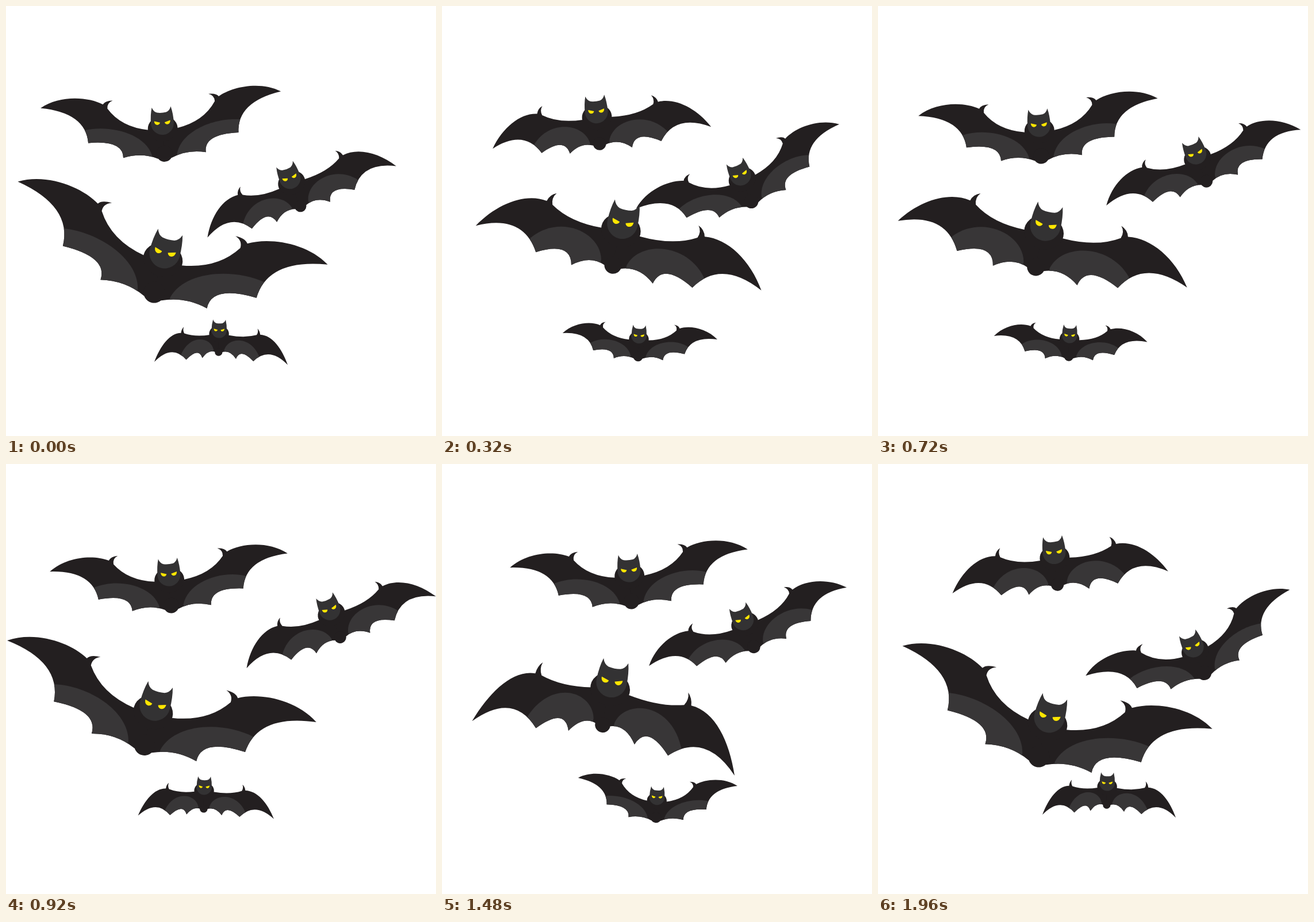
Write an HTML page with a canvas that moves like this. It is 748 by 748 pixels and loops after 2000 ms.

```html
<!DOCTYPE html>
<html lang="en">
<head>
<meta charset="utf-8">
<title>Flying bats</title>
<style>
html, body { margin: 0; height: 100%; overflow: hidden; background: #fff; }
canvas { display: block; }
</style>
</head>
<body>
<canvas id="stage" width="748" height="748"></canvas>
<script>
const ctx = document.getElementById('stage').getContext('2d');
const LOOP = 2000, STEP = 40, BOB = 48;
const DARK = '#231f20', GREY = '#383637', HEAD = '#333233', EYE = '#ffe600';

// Wing points, relative to the head: raised x, y, lowered x, y
const WING = [
  [25, 10, 25, 12],                                             // shoulder
  [72, 2, 65, 19], [93.6, -32, 95, 10],                         // arm
  [94, -42, 100, 2], [83.5, -45.5, 97, -7],                     // thumb
  [97, -46, 103, -1], [101, -40, 104, 9],
  [125, -55, 135, 10], [175, -62, 160, 45], [209.5, -41, 175, 87], // tip
  [132, -28, 128, 38], [131, 25.3, 88, 79],                     // scallops
  [70, 24, 55, 44], [72, 55.4, 44, 73.5],
  [40, 48, 28, 50], [12, 61, 9, 57]
];
const ARC = [[22, 54, 14, 51], [32, 15, 22, 18], [92, -4, 78, 10], [135.5, 2.8, 102, 65]];

// Flap: period, time of the raised pose, depth. Tilt: raised, change when lowered.
// xs, ys: path of the resting point at TIMES.
const TIMES = [0, 160, 520, 920, 1240, 1480, 1960];
const BATS = [
  { size: 1, period: 800, raised: 0, depth: .75, tilt: [-4, -2.5],
    xs: [272, 267, 279, 284, 312, 326, 310], ys: [204, 210.5, 220, 200, 193, 193, 189] },
  { size: .925, period: 800, raised: 455, depth: .74, tilt: [-23.2, 3.5],
    xs: [505, 508, 542, 574, 552, 531, 550], ys: [329, 320, 282, 282, 276, 289, 322] },
  { size: 1.332, period: 980, raised: 20, depth: 1, tilt: [15, -3.3],
    xs: [276, 295, 306, 258, 263, 282, 298], ys: [430, 424, 418, 424, 430, 442, 441] },
  { size: .662, period: 980, raised: 510, depth: 1, tilt: [2.9, -1.6],
    xs: [370, 358, 328, 344, 360, 374, 398], ys: [596, 590, 580, 592, 586, 580, 587] }
];

// Smooth curve through the values at TIMES
function spline(values, t) {
  const last = TIMES.length - 1;
  let i = 0;
  while (i < last - 1 && t > TIMES[i + 1]) i++;
  const slope = j => {
    const a = Math.max(j - 1, 0), b = Math.min(j + 1, last);
    return (values[b] - values[a]) / (TIMES[b] - TIMES[a]);
  };
  const span = TIMES[i + 1] - TIMES[i], u = (t - TIMES[i]) / span, v = 1 - u;
  return values[i] * v * v * (1 + 2 * u) + values[i + 1] * u * u * (3 - 2 * u)
    + span * u * v * (slope(i) * v - slope(i + 1) * u);
}

function drawWing(side, k) {
  const stretch = side * (1 + .12 * k * (1 - k) + side * .04 * k);
  const pose = ([ux, uy, dx, dy]) => [(ux + (dx - ux) * k) * stretch, uy + (dy - uy) * k];
  const p = WING.map(pose), a = ARC.map(pose);
  const quad = i => ctx.quadraticCurveTo(...p[i], ...p[i + 1]);

  ctx.beginPath();
  ctx.moveTo(-side, 8);
  ctx.lineTo(...p[0]);
  [1, 3, 5].forEach(quad);
  ctx.bezierCurveTo(...p[7], ...p[8], ...p[9]);
  [10, 12, 14].forEach(quad);
  ctx.lineTo(-side, 60);
  ctx.closePath();
  ctx.fillStyle = DARK;
  ctx.fill();

  ctx.save();
  ctx.clip();
  ctx.beginPath();
  ctx.moveTo(...a[0]);
  ctx.bezierCurveTo(...a[1], ...a[2], ...a[3]);
  ctx.lineTo(a[3][0] + side * 10, 120);
  ctx.lineTo(a[0][0], 120);
  ctx.fillStyle = GREY;
  ctx.fill();
  ctx.restore();
}

function drawBody(k) {
  const r = 14 - 4 * k;
  ctx.fillStyle = DARK;
  ctx.beginPath();
  ctx.ellipse(0, 9, 26, 22, 0, 0, 7);
  ctx.fill();
  ctx.beginPath();
  ctx.ellipse(0, 67 - r, r, r, 0, 0, 7);
  ctx.fill();
  ctx.fillStyle = HEAD;
  ctx.fill(headShape);
  ctx.fillStyle = EYE;
  ctx.fill(eyeShape);
}

const headShape = new Path2D('M-20 0Q-20 -16 -16.5 -28.5Q-14 -21 -8 -19Q0 -17.5 8 -19Q14 -21 16.5 -28.5Q20 -16 20 0A20 20 0 0 1 -20 0Z');
const eyeShape = new Path2D('M-14 -4.5L-4 -1.5C-5 4 -14 4 -14 -4.5ZM14 -4.5L4 -1.5C5 4 14 4 14 -4.5Z');

function drawBat(bat, t) {
  const k = bat.depth * (1 - Math.cos(2 * Math.PI * (t - bat.raised) / bat.period)) / 2;
  ctx.save();
  ctx.translate(spline(bat.xs, t), spline(bat.ys, t));
  ctx.rotate((bat.tilt[0] + bat.tilt[1] * k) * Math.PI / 180);
  ctx.scale(bat.size, bat.size);
  ctx.translate(0, -BOB * k);
  drawWing(-1, k);
  drawWing(1, k);
  drawBody(k);
  ctx.restore();
}

const start = performance.now();
function frame() {
  const t = Math.floor((performance.now() - start) % LOOP / STEP) * STEP;
  ctx.fillStyle = '#fff';
  ctx.fillRect(0, 0, 748, 748);
  BATS.forEach(bat => drawBat(bat, t));
  requestAnimationFrame(frame);
}
frame();
</script>
</body>
</html>
```
